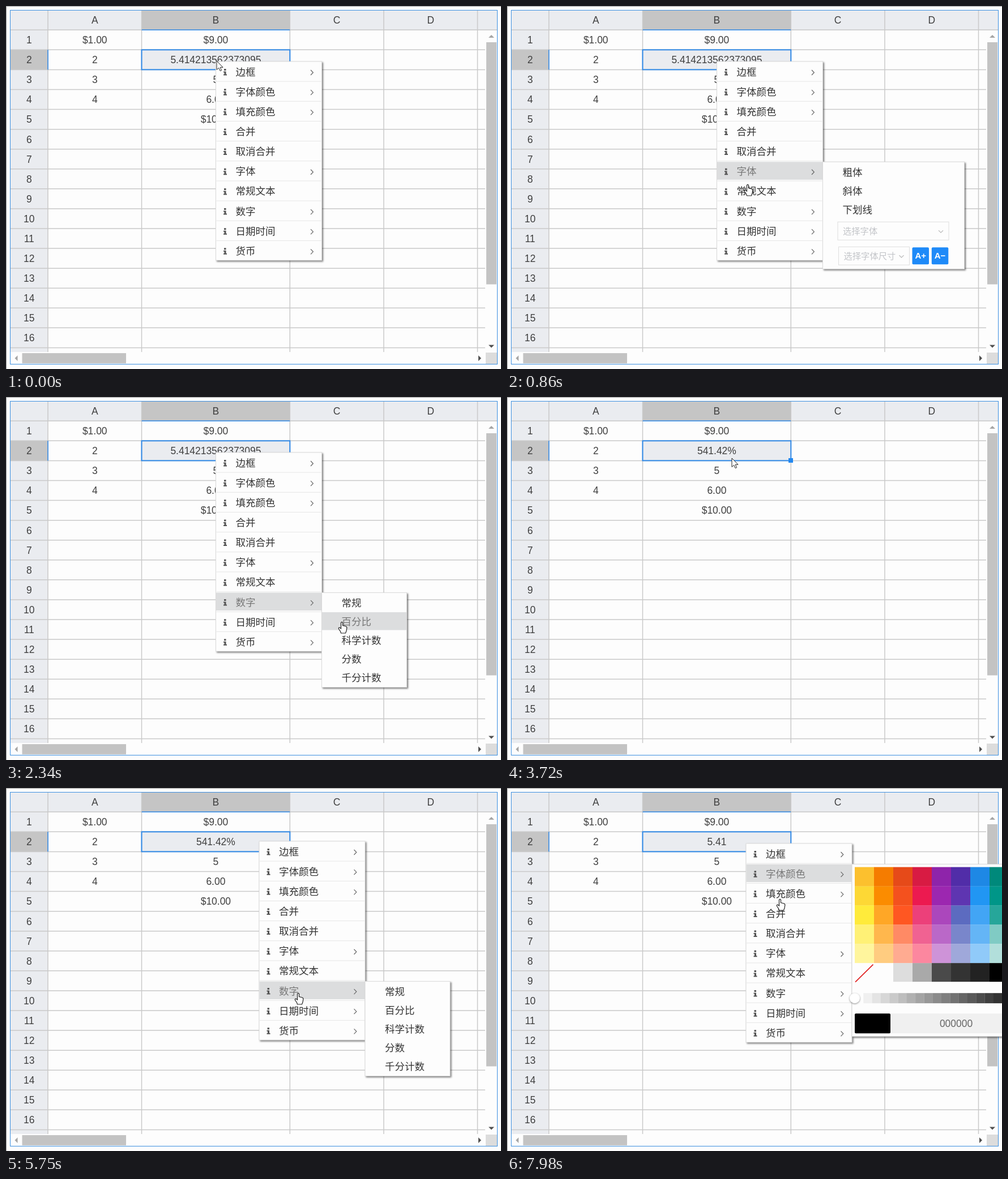
An HTML page for the animation above (8000 ms loop, 874x641 px).

```html
<!DOCTYPE html>
<html lang="zh-CN">
<head>
<meta charset="utf-8">
<title>Spreadsheet context menu</title>
<style>
html, body { margin: 0; width: 100%; height: 100%; overflow: hidden; background: #fdfdfd; }
svg { display: block; }
text { font: 17.45px "Liberation Sans", Arial, sans-serif; fill: #3f3f3f; }
.cjk { font: 300 17.5px "Noto Sans CJK SC", "Noto Sans CJK", sans-serif; fill: #333; }
.hint { font-size: 15.3px; fill: #c2c4c8; }
.btn { font-size: 15px; font-weight: bold; fill: #fff; }
.on .cjk { fill: #777; }
.bar { fill: #dcddde; visibility: hidden; }
.on .bar { visibility: visible; }
.panel { fill: #fdfdfd; stroke: #dcdcdc; filter: drop-shadow(2px 2px 1.5px rgba(0,0,0,.5)); }
</style>
</head>
<body>
<svg id="stage" width="874" height="641" viewBox="0 0 874 641"></svg>
<script>
const LOOP = 8000, LAG = 60;
const BLUE = '#2f88e6', LINE = '#c9c9c9';
const MENU_W = 187, ROW = 35.15, SUB_ROW = 33;
const stage = document.getElementById('stage');

function el(parent, tag, attrs = {}, text) {
  const node = document.createElementNS('http://www.w3.org/2000/svg', tag);
  for (const key in attrs) node.setAttribute(key, attrs[key]);
  if (text !== undefined) node.textContent = text;
  return parent.appendChild(node);
}
const group = (parent, attrs) => el(parent, 'g', attrs);
const rect = (parent, x, y, width, height, fill, more) =>
  el(parent, 'rect', { x, y, width, height, fill, ...more });
const path = (parent, d, stroke, width = 1, fill = 'none') =>
  el(parent, 'path', { d, stroke, fill, 'stroke-width': width });
const label = (x, y, text) =>
  el(stage, 'text', { x, y: y + 6.3, 'text-anchor': 'middle' }, text);
const cjk = (parent, x, y, text, cls = '') =>
  el(parent, 'text', { x, y: y + (cls ? 5.8 : 6.6), class: 'cjk ' + cls }, text);
const show = (node, on) => node.setAttribute('visibility', on ? 'visible' : 'hidden');
const move = (node, x, y) => node.setAttribute('transform', `translate(${x} ${y})`);

// Sheet
const cols = [7.5, 74, 239.5, 501.3, 667, 832.5];
const rowY = i => 42.3 + 35.07 * i;
const midX = i => (cols[i] + cols[i + 1]) / 2;
const midY = i => rowY(i) + 17.6;

rect(stage, 0, 0, 874, 641, '#fdfdfd');
path(stage, 'M0 640V.5H874M.5 0V641', '#999');
rect(stage, 8, 8, 859, 34, '#eaecf0');
rect(stage, 8, 8, 66, 603, '#eaecf0');
rect(stage, cols[2], 8, cols[3] - cols[2], 34, '#c5c5c5');
rect(stage, 8, rowY(1), 66, 35, '#c5c5c5');
for (let i = 0; i < 17; i++) path(stage, `M8 ${rowY(i)}H${i ? 846 : 867}`, LINE, 1.5);
for (const x of cols.slice(1)) path(stage, `M${x} 8V611`, LINE, 1.5);
[...'ABCD'].forEach((name, i) => label(midX(i + 1), 25, name));
for (let i = 0; i < 16; i++) label(midX(0), midY(i), i + 1);

rect(stage, cols[2], rowY(1), 261.8, 35, '#eaecf0');
path(stage, `M${cols[2]} 42.3H${cols[3]}M74 ${rowY(1)}V${rowY(2)}`, BLUE, 1.5);
['$1.00', 2, 3, 4].forEach((v, i) => label(midX(1), midY(i), v));
const cells = ['$9.00', '', 5, '6.00', '$10.00'].map((v, i) => label(midX(2), midY(i), v));
rect(stage, cols[2], rowY(1), 261.8, 35, 'none', { stroke: BLUE, 'stroke-width': 2 });
rect(stage, 497, 108, 8, 8, '#2388f0');

// Scrollbars and frame
rect(stage, 847, 43, 20, 569, '#fdfdfd');
rect(stage, 8, 611, 859, 21, '#fdfdfd');
rect(stage, 848, 64, 18, 427.5, '#c3c3c3');
rect(stage, 28.5, 613, 183.5, 18, '#c3c3c3');
rect(stage, 847, 612, 20, 20, '#dcdcdc');
path(stage, 'M852 56h10l-5-5z', 'none', 0, '#a5a5a5');
path(stage, 'M852 598.500h10l-5 5z', 'none', 0, '#505050');
path(stage, 'M20.500 617v10l-5-5z', 'none', 0, '#a5a5a5');
path(stage, 'M834 617v10l5-5z', 'none', 0, '#505050');
rect(stage, 7.5, 7.5, 860, 625, 'none', { stroke: '#3c8fe0' });

// Context menu
const menu = group(stage);
rect(menu, 0, 0, MENU_W, 351, '', { class: 'panel' });
const names = ['边框', '字体颜色', '填充颜色', '合并', '取消合并', '字体', '常规文本', '数字', '日期时间', '货币'];
const flat = [3, 4, 6];
const items = names.map((name, i) => {
  const g = group(menu, { transform: `translate(0 ${i * ROW})` });
  if (i) path(g, `M1 0H${MENU_W - 1}`, '#e6e6e6');
  rect(g, .5, 1.5, MENU_W - 1, 31.5, '', { class: 'bar' });
  path(g, 'M14.500 13h3.500v3h-3.500zM13.500 17.500h4.500v5h1.500v2h-6v-2h1.500v-3h-1.500z', 'none', 0, '#555');
  cjk(g, 35, 18, name);
  if (!flat.includes(i)) path(g, 'M167.500 15l4.300 4.500-4.300 4.500', '#666', 1.2);
  return g;
});

function submenu(width, height) {
  const g = group(menu);
  rect(g, 0, 0, width, height, '', { class: 'panel' });
  return g;
}

// Number formats
const numbers = submenu(150, 167);
const formats = ['常规', '百分比', '科学计数', '分数', '千分计数'].map((name, i) => {
  const g = group(numbers, { transform: `translate(0 ${i * SUB_ROW})` });
  rect(g, .5, 1.5, 149, 31.5, '', { class: 'bar' });
  cjk(g, 35, 18.3, name);
  return g;
});

// Font options
const fonts = submenu(250, 189);
['粗体', '斜体', '下划线'].forEach((name, i) => cjk(fonts, 35, 18 + i * SUB_ROW, name));
function picker(x, y, width, text) {
  rect(fonts, x, y, width, 32, '#fdfdfd', { stroke: '#dedede' });
  cjk(fonts, x + 9, y + 15.5, text, 'hint');
  path(fonts, `M${x + width - 18} ${y + 15}l4 4 4-4`, '#bbb', 1.2);
}
picker(26.5, 106, 196, '选择字体');
picker(28, 150, 125, '选择字体尺寸');
['A+', 'A−'].forEach((text, i) => {
  rect(fonts, 158 + i * 34.3, 151, 29.5, 30, '#1e8af8', { rx: 2 });
  el(fonts, 'text', { x: 172.7 + i * 34.3, y: 171, class: 'btn', 'text-anchor': 'middle' }, text);
});

// Color board
const palette = [
  'fcc02e f57c00 e64a19 d81b43 8e24aa 512da8 1e88e5 00897b 388e3c',
  'fdd835 fb8c00 f4511e ec1a50 9c27b0 5e35b1 2196f3 009688 4caf50',
  'ffeb3b ffa726 ff5722 ec407a ab47bc 5c6bc0 42a5f5 26a69a 66bb6a',
  'fff176 ffb74d ff8a65 f06292 ba68c8 7986cb 64b5f6 80cbc4 81c784',
  'fff59d ffcc80 ffab91 fc879f ce93d8 9fa8da 90caf9 b2dfdb a5d6a7',
  'fdfdfd fdfdfd dddddd a9a9a9 4a4a4a 333333 222222 000000'
];
const colors = submenu(316, 304);
palette.forEach((row, r) => row.split(' ').forEach((c, i) =>
  rect(colors, 5 + i * 34, 5 + r * 33.9, 34.2, r < 5 ? 34.1 : 33, '#' + c)));
path(colors, 'M6 208L37.500 177', '#e01b1b', 1.6);
for (let i = 0; i < 20; i++) {
  const v = Math.round(253 * (1 - i / 20));
  rect(colors, 5 + i * 15.3, 227.5, 15.5, 18, `rgb(${v},${v},${v})`);
}
el(colors, 'circle', { cx: 5, cy: 236.5, r: 9, fill: '#fff', style: 'filter:drop-shadow(0 1px 1.5px rgba(0,0,0,.45))' });
rect(colors, 5, 263.5, 306, 35, '#f0f0f0', { rx: 2 });
rect(colors, 5, 263.5, 63, 35, '#000', { rx: 2 });
el(colors, 'text', { x: 184, y: 287, 'text-anchor': 'middle', style: 'fill:#666' }, '000000');

const subs = { 1: colors, 2: colors, 5: fonts, 7: numbers };

// Pointers
const pointer = group(stage);
const arrow = path(pointer, 'M0 0V15.500L3.700 12.200L6.200 17.700L8.600 16.600L6.200 11.300H11Z', '#222', 1, '#fff');
const hand = path(pointer, 'M-1.500 1.500Q0-.6 1.500 1.500V6.500L7 8Q9 8.600 8.800 11L8 16L6.500 20H-1.500L-2.500 17L-5.500 12.500Q-6.200 9.800-4 10L-1.500 12Z', '#222', 1.2, '#fff');

// Pointer legs: start, last step, steps, x, y
const legs = [
  [90, 860, 12, 425, 315],
  [920, 1400, 8, 412, 360],
  [1860, 2203, 6, 575, 368],
  [2272, 2340, 2, 593, 397],
  [3350, 3720, 6, 397, 108],
  [3800, 3800, 1, 387, 105],
  [3880, 4050, 3, 447, 93],
  [4510, 4690, 4, 523, 236],
  [4750, 5170, 7, 518, 316],
  [5600, 5750, 3, 516, 362],
  [6090, 6330, 4, 686, 361],
  [6910, 7370, 8, 421, 97],
  [7920, 7980, 2, 482, 196]
];
// Menu openings: start, end, x, y
const openings = [[0, 2890, 370.5, 98], [4200, 6510, 447, 94], [7590, LOOP, 422, 98]];

function pointerAt(t) {
  let x = 372, y = 97;
  for (const [start, last, n, toX, toY] of legs) {
    if (t < start) break;
    const gap = (last - start) / (n - 1 || 1) || 1;
    const p = Math.min(n, Math.floor((t - start) / gap + 1e-6) + 1) / n;
    x += (toX - x) * p;
    y += (toY - y) * p;
  }
  return [x, y];
}

function render(t) {
  const [x, y] = pointerAt(t);
  const open = openings.find(([from, to]) => t >= from && t < to);
  let over = false;
  menu.style.display = open ? '' : 'none';
  if (open) {
    const [, , left, top] = open;
    const [hx, hy] = pointerAt(t - LAG);
    const inSub = hx > left + MENU_W;
    const row = inSub ? 7 : Math.floor((hy - top) / ROW);
    const subTop = row * ROW + 1.5;
    const format = inSub ? Math.floor((hy - top - subTop) / SUB_ROW) : -1;
    move(menu, left, top);
    items.forEach((g, i) => g.classList.toggle('on', i === row));
    formats.forEach((g, i) => g.classList.toggle('on', i === format));
    for (const sub of [colors, fonts, numbers]) sub.style.display = sub === subs[row] ? '' : 'none';
    if (subs[row]) move(subs[row], MENU_W, subTop);
    over = y > top && x >= left;
  }
  show(hand, over);
  show(arrow, !over);
  move(pointer, x, y);
  cells[1].textContent = t < 2890 ? '5.414213562373095' : t < 6600 ? '541.42%' : '5.41';
}

const began = performance.now();
function tick() {
  render((performance.now() - began) % LOOP);
  requestAnimationFrame(tick);
}
tick();
</script>
</body>
</html>
```
